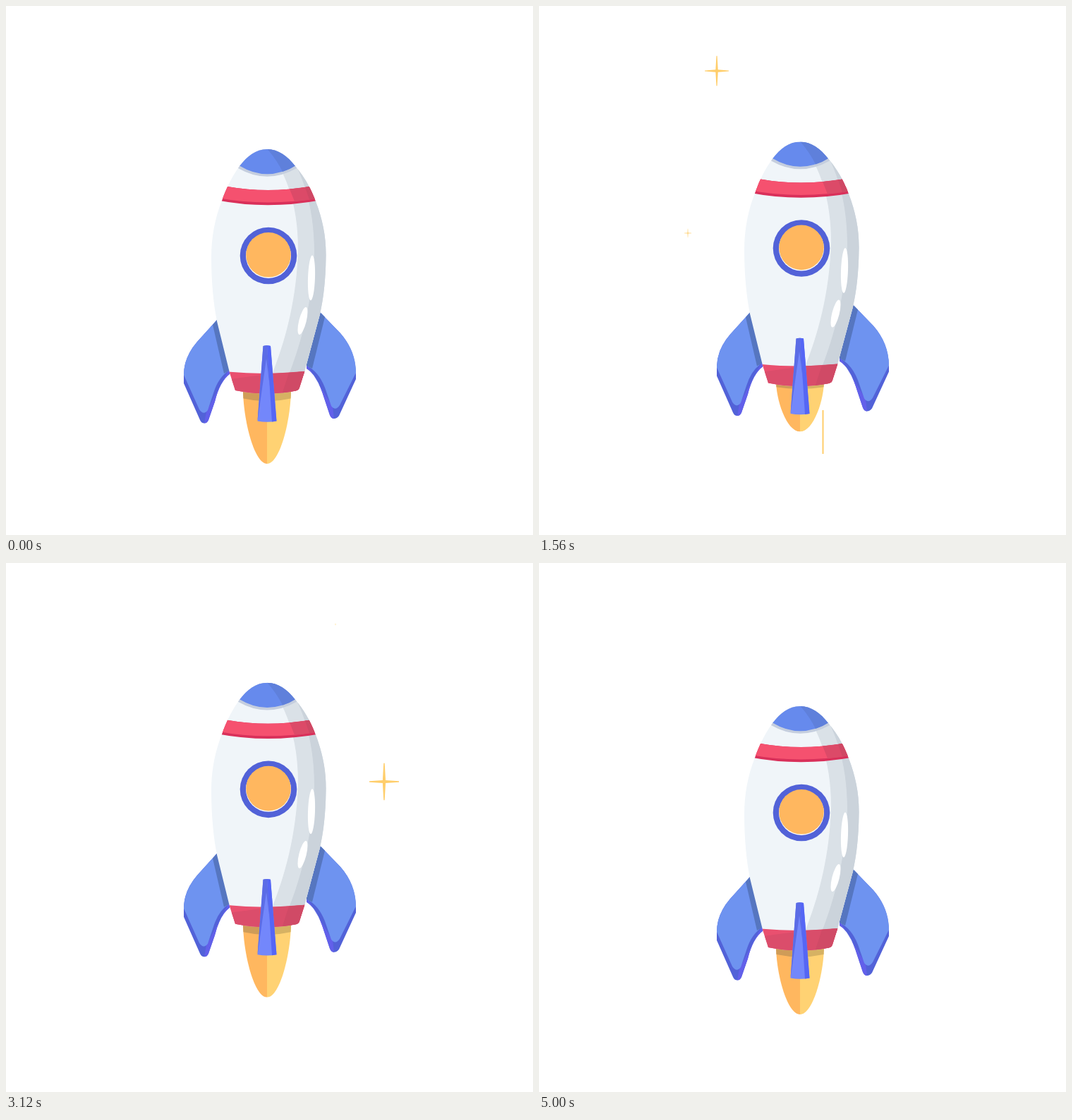
Recreate the animation shown at these times as an HTML page. Size 747 by 750 pixels, loop 5.04 s.

```html
<!DOCTYPE html>
<html lang="en">
<head>
<meta charset="utf-8">
<title>Rocket</title>
<style>
html, body { margin: 0; width: 100%; height: 100%; overflow: hidden; background: #fff; }
svg { display: block; width: 100%; height: 100%; }
</style>
</head>
<body>
<svg viewBox="0 0 747 750" xmlns="http://www.w3.org/2000/svg">
  <defs>
    <clipPath id="hull">
      <path d="M370 203C386 203 399 213 410 227C422 241 431 256 439 277C449 303 454 328 453.5 356C453 390 450 415 445 437L423 519L416 541Q415 544.500 411 545.500Q370 554 325 545L317 520L299 447C294 422 291 390 291 356C291 328 296 301 306 276C313 256 321 241 331 227C342 213 354 203 370 203Z"/>
    </clipPath>
    <clipPath id="jet">
      <path d="M336 538C335 582 351 649 370 649C389 649 405 582 404 538Z"/>
    </clipPath>
    <clipPath id="sky"><path d="M0 0H747V748H0Z"/></clipPath>
  </defs>

  <g id="streaks" clip-path="url(#sky)"></g>

  <g id="rocket">
    <g id="flame">
      <g clip-path="url(#jet)">
        <path fill="#ffb75f" d="M330 538H370V650H330Z"/>
        <path fill="#ffd273" d="M370 538H410V650H370Z"/>
        <path fill="#cf9c58" d="M330 538H370V560.500Q350 560 330 555Z"/>
        <path fill="#d6b263" d="M370 538H410V555Q390 560 370 560.500Z"/>
      </g>
    </g>

    <!-- left fin -->
    <path fill="#5262d8" d="M299 445L271 476Q252 498 252 523V535L275 587Q277 591.500 281 591.500Q285 591.500 287 587L296 561Q303 532 318 521Z"/>
    <path fill="#6260ea" d="M281 591.500Q285 591.500 287 587L296 561Q303 532 318 521L316 515L284 575Z"/>
    <path fill="#6e93f0" d="M299 445L271 476Q252 498 252 523L274 572Q280 581 286 573L294 549Q301 526 317 516Z"/>
    <path fill="#5676c0" d="M299 445L293 452L309 521L317 516.500V505Z"/>

    <!-- right fin -->
    <path fill="#5262d8" d="M445 434L474 464Q496 489 496 523V529L472 581Q469 585 465 585Q461 585 459 580L451 556Q441 523 426 514Z"/>
    <path fill="#6260ea" d="M465 585Q461 585 459 580L451 556Q441 523 426 514V507L463 568Z"/>
    <path fill="#6e93f0" d="M445 434L474 464Q496 489 496 520L473 566Q467 575 461 567L452 541Q443 518 426 510Z"/>
    <path fill="#5676c0" d="M445 434L452 441L434 514L426 510V500Z"/>

    <!-- hull -->
    <g clip-path="url(#hull)">
      <path fill="#f0f5f9" d="M285 200H460V560H285Z"/>
      <path fill="#dae1e7" d="M368 200C401 238 414 290 414 345C412 420 394 480 377 522H460V200Z"/>
      <path fill="#cbd3db" d="M398 205C427 245 437 300 437 350C435 420 416 485 401 522H460V200Z"/>
      <path fill="#c5cede" d="M320 222L329 230Q370 253.500 412 230L420 200H320Z"/>
      <path fill="#668aed" d="M320 215L331 226.500Q370 250 410 226.500L420 200H320Z"/>
      <path fill="#5f80db" d="M368 200Q384 218 392 235Q402 232 410 226.500L420 200Z"/>

      <path fill="#d9305a" d="M300 255L314 256Q370 266 431 256L445 256V275.500Q370 289 300 275.500Z"/>
      <path fill="#f5516f" d="M300 253.500L314 256Q370 266 431 256L445 253.500V272Q370 285 300 272Z"/>
      <path fill="#dc4a68" d="M402 259.500L431 256L445 253.500V272Q425 276 409 277Z"/>
      <path fill="#cf4864" d="M424 257L445 253V272L430 274.500Z"/>

      <path fill="#e9506f" d="M310 518Q370 524 430 517.500V560H310Z"/>
      <path fill="#db4d6b" d="M310 530L378 521L366 560H310Z"/>
      <path fill="#d94d6a" d="M378 521L430 517.500V560H362Z"/>
      <path fill="#d04a66" d="M401 520L430 517.500V560H388Z"/>
    </g>
    <ellipse cx="433" cy="385.500" rx="5" ry="32" fill="#fff" transform="rotate(2 433 385.500)"/>
    <ellipse cx="420.500" cy="446.500" rx="5.200" ry="20" fill="#fff" transform="rotate(14 420.500 446.500)"/>

    <circle cx="372" cy="354" r="40.300" fill="#5262d8"/>
    <circle cx="372" cy="354" r="32" fill="#fff"/>
    <circle cx="372" cy="352.800" r="31.800" fill="#ffb75f"/>

    <!-- middle fin -->
    <path fill="#7387fb" d="M364.500 482Q370 480.500 375 482L383.500 588.500Q370 591 356.500 588.500Z"/>
    <path fill="#5566f5" d="M370 481.200Q373 481.200 375 482L383.500 588.500L377 589.500Z"/>
    <path fill="#5b6ce6" d="M364.500 482Q367 481 370 481.200L374 540L369 500L356.500 588.500Z"/>
  </g>

  <g id="stars" fill="#ffce6b"></g>
</svg>
<script>
const LOOP = 5040, STEP = 40;
const BOB = 2500 / 3, LIFT = 64;
const FLICKER = 240, FLAME_TOP = 538, FLAME_MIN = 0.685;
const RAY = 'M-.8-30H.8L2.400-2.400 24-.8V.8L2.400 2.400 .8 30H-.8L-2.400 2.400-24 .8V-.8L-2.400-2.400Z';

// x, y, time of full size, time to grow or shrink, size
const stars = [
  [536, 160, 608, 540, 0.98],
  [211, 322, 1200, 518, 0.94],
  [252, 92, 1750, 567, 0.96],
  [536, 310, 2988, 540, 1.03],
  [467, 87, 3570, 530, 0.94],
  [252, 241, 4152, 570, 0.96]
];

// x, width, moment and height of the lower end, speed in px per ms
const streaks = [
  { x: 347.5, w: 1, at: 116.7, y: 610, v: 2.5, color: '#e9b45f' },
  { x: 402.5, w: 2, at: 310, y: 635, v: 2.3, color: '#ffce6b' }
];
const STREAK_LOOP = BOB / 2, STREAK_LEN = 62;

const byId = id => document.getElementById(id);
const ease = x => x * x * (3 - 2 * x);
// 0 at both ends of a cycle, 1 in the middle
const wave = (t, period) => ease(1 - Math.abs(1 - 2 * (t / period % 1)));

function add(parent, tag, attrs) {
  const el = document.createElementNS('http://www.w3.org/2000/svg', tag);
  for (const key in attrs) el.setAttribute(key, attrs[key]);
  return byId(parent).appendChild(el);
}

const starEls = stars.map(() => add('stars', 'path', { d: RAY }));
const streakEls = streaks.map(s => add('streaks', 'rect', {
  x: s.x - s.w / 2, width: s.w, height: STREAK_LEN, fill: s.color
}));

function draw(t) {
  byId('rocket').setAttribute('transform', `translate(0 ${-LIFT * wave(t, BOB)})`);

  const k = 1 - (1 - FLAME_MIN) * wave(t, FLICKER);
  byId('flame').setAttribute('transform',
    `translate(0 ${FLAME_TOP}) scale(1 ${k}) translate(0 ${-FLAME_TOP})`);

  stars.forEach(([x, y, peak, half, size], i) => {
    const s = size * ease(Math.max(0, 1 - Math.abs(t - peak) / half));
    starEls[i].setAttribute('transform', `translate(${x} ${y}) scale(${s})`);
    starEls[i].setAttribute('visibility', s > 0.02 ? 'visible' : 'hidden');
  });

  const p = t % STREAK_LOOP;
  streaks.forEach((s, i) => {
    const end = s.y + s.v * (p - s.at);
    streakEls[i].setAttribute('y', end - STREAK_LEN);
    streakEls[i].setAttribute('visibility', end > 520 ? 'visible' : 'hidden');
  });
}

const start = performance.now();
function tick() {
  const t = (performance.now() - start) % LOOP;
  draw(Math.floor(t / STEP) * STEP);
  requestAnimationFrame(tick);
}
draw(0);
requestAnimationFrame(tick);
</script>
</body>
</html>
```
